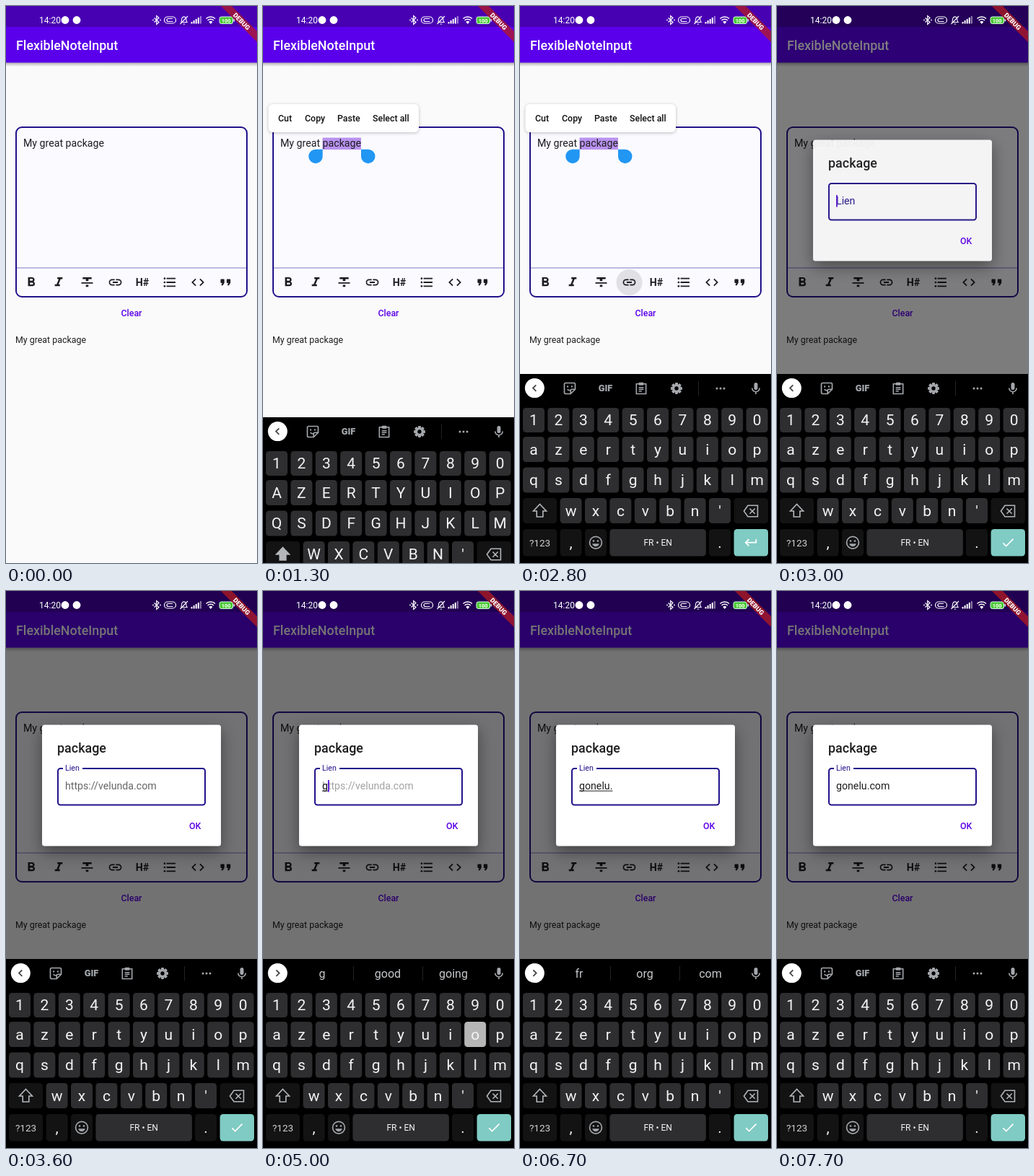
Recreate the animation shown at these times as an HTML page. Size 348 px wide and 772 px high, loop 8000 ms.

```html
<!DOCTYPE html>
<html lang="en">
<head>
<meta charset="utf-8">
<title>Link dialog</title>
<style>
html, body { margin: 0; width: 100%; height: 100%; overflow: hidden; background: #fafafa; }
svg { display: block; width: 100vw; height: 100vh; }
text { font-family: Roboto, sans-serif; white-space: pre; }
</style>
</head>
<body>
<svg id="stage" viewBox="0 0 348 772"></svg>
<script>
const NS = 'http://www.w3.org/2000/svg';
const LOOP = 8000, STEP = 100;
const INDIGO = '#21128a', PURPLE = '#5c00e6', INK = '#1d1d1f', GREY = '#a4a8ac';
const stage = document.getElementById('stage');

function add(parent, tag, attrs = {}) {
  const el = document.createElementNS(NS, tag);
  for (const k in attrs) el.setAttribute(k, attrs[k]);
  parent.appendChild(el);
  return el;
}
const set = (el, attrs) => { for (const k in attrs) el.setAttribute(k, attrs[k]); };
const group = (parent, attrs) => add(parent, 'g', attrs);
const rect = (parent, x, y, width, height, fill, rx = 0, more = {}) =>
  add(parent, 'rect', { x, y, width, height, fill, rx, ...more });
const circle = (parent, cx, cy, r, fill, more = {}) => add(parent, 'circle', { cx, cy, r, fill, ...more });
const path = (parent, d, fill, more = {}) => add(parent, 'path', { d, fill, ...more });
const line = (parent, d, stroke, width = 1.5, more = {}) =>
  path(parent, d, 'none', { stroke, 'stroke-width': width, ...more });
function text(parent, str, x, y, size, fill, weight = 400, anchor = 'start') {
  const el = add(parent, 'text', { x, y, 'font-size': size, fill, 'font-weight': weight, 'text-anchor': anchor });
  el.textContent = str;
  return el;
}
const show = (el, on) => el.setAttribute('visibility', on ? 'inherit' : 'hidden');
const alpha = (el, a) => { el.setAttribute('opacity', a); show(el, a > 0); };
// 24-unit icon centred on a point
const icon = (parent, cx, cy, size = 21.3) =>
  group(parent, { transform: `translate(${cx - size / 2} ${cy - size / 2}) scale(${size / 24})` });

const clamp = v => Math.max(0, Math.min(1, v));
const ramp = (t, from, to) => clamp((t - from) / (to - from));
const easeOut = p => 1 - (1 - p) ** 3;
const latest = (list, t) => list.reduce((found, row) => row[0] <= t ? row : found);

// ---------- page ----------
const defs = add(stage, 'defs');
const shade = add(defs, 'linearGradient', { id: 'shade', x1: 0, y1: 0, x2: 0, y2: 1 });
add(shade, 'stop', { offset: 0, 'stop-color': '#000', 'stop-opacity': .32 });
add(shade, 'stop', { offset: 1, 'stop-color': '#000', 'stop-opacity': 0 });

const page = group(stage);
rect(page, 0, 0, 348, 772, '#fafafa');
rect(page, 0, 78, 348, 6, 'url(#shade)');
rect(page, 0, 0, 348, 78.5, '#5b00eb');
rect(page, 0, 0, 348, 29, '#4800b3');
text(page, 'FlexibleNoteInput', 14, 60.5, 17.9, '#fff', 500);

rect(page, 14, 168, 320, 235, '#fafaff', 8, { stroke: INDIGO, 'stroke-width': 2 });
rect(page, 15, 362.5, 318, 1, '#8078c4');
const selection = rect(page, 82.5, 182.5, 53.5, 16.5, '#b992f0');
text(page, 'My great package', 24, 195.3, 14.18, INK);

const ripple = circle(page, 151.5, 383, 18, '#000');
const toolPaths = [
  [35, 'M15.6 10.8c1-.7 1.65-1.8 1.65-2.8 0-2.3-1.75-4-4-4H7v14h7c2.1 0 3.7-1.7 3.7-3.8 0-1.5-.8-2.8-2.1-3.4zM10 6.5h3a1.5 1.5 0 0 1 0 3h-3zm3.5 9H10v-3h3.5a1.5 1.5 0 0 1 0 3z'],
  [73, 'M10 4v3h2.2l-3.4 8H6v3h8v-3h-2.2l3.4-8H18V4z'],
  [112.5, 'M10 19h4v-3h-4zM5 4v3h5v3h4V7h5V4zM3 14h18v-2H3z'],
  [151.5, 'M3.9 12A3.1 3.1 0 0 1 7 8.9h4V7H7a5 5 0 0 0 0 10h4v-1.9H7A3.1 3.1 0 0 1 3.9 12zM8 13h8v-2H8zM17 7h-4v1.9h4a3.1 3.1 0 0 1 0 6.2h-4V17h4a5 5 0 0 0 0-10z'],
  [227, 'M7 19h14v-2H7zM7 13h14v-2H7zM7 5v2h14V5z'],
  [266, 'M9.4 16.6L4.8 12l4.6-4.6L8 6l-6 6 6 6zM14.6 16.6l4.6-4.6-4.6-4.6L16 6l6 6-6 6z']
];
for (const [x, d] of toolPaths) path(icon(page, x, 383), d, INK);
for (const y of [6, 12, 18]) circle(icon(page, 227, 383), 4, y, 1.5, INK);
const quote = icon(page, 305, 383);
for (const x of [0, 9.5])
  path(quote, 'M6.2 17c.5 0 1-.3 1.2-.7l1.9-3.2c.2-.3.2-.6.2-.9V8c0-.6-.4-1-1-1h-4c-.6 0-1 .4-1 1v4c0 .6.4 1 1 1h1.8L5 15.1c-.4.9.2 1.9 1.2 1.9z', INK, { transform: `translate(${x})` });
text(page, 'H#', 189, 388, 14.2, INK, 700, 'middle');
text(page, 'Clear', 174, 429.8, 12.4, PURPLE, 500, 'middle');
text(page, 'My great package', 13, 466.6, 12.4, INK);

const handles = group(page);
path(handles, 'M82.7 198.7V208.4A9.75 9.75 0 1 1 72.95 198.7z', '#2196f3');
path(handles, 'M136 198.7V208.4A9.75 9.75 0 1 0 145.75 198.7z', '#2196f3');

const menu = group(page);
rect(menu, 7.5, 136, 208.5, 39, '#fff', 6, { style: 'filter:drop-shadow(0 1px 2px rgba(0,0,0,.25))' });
[['Cut', 21], ['Copy', 58], ['Paste', 103], ['Select all', 152]]
  .forEach(([label, x]) => text(menu, label, x, 160, 12.4, '#111', 500));

// ---------- dialog ----------
const scrim = rect(stage, 0, 0, 348, 772, '#000');
const dialog = group(stage);
rect(dialog, 50, 185.5, 248, 168, '#fff', 3.5, { style: 'filter:drop-shadow(0 8px 11px rgba(0,0,0,.42))' });
text(dialog, 'package', 71, 223.5, 17.9, INK, 500);
rect(dialog, 72, 246, 204, 50.5, 'none', 3.5, { stroke: INDIGO, 'stroke-width': 2 });
const notch = rect(dialog, 79, 244, 27, 4, '#fff');
const hint = text(dialog, 'https://velunda.com', 82, 275, 14.18, '#666');
const label = text(dialog, 'Lien', 82, 275, 14.18, INDIGO);
const typed = text(dialog, '', 82, 275, 14.18, INK);
const underline = rect(dialog, 82, 276.6, 0, 1, INK);
const caret = rect(dialog, 82, 262, 1.8, 16.5, '#5a10dc');
text(dialog, 'OK', 254, 329.6, 12.4, PURPLE, 500);

// ---------- status bar ----------
const status = group(stage);
text(status, '14:20', 46, 24.2, 12, '#fff');
circle(status, 82, 19.5, 5.4, '#fff');
circle(status, 98, 19.5, 5.4, '#fff');
line(status, 'M205.5 16.5l6.5 6-3.3 3v-12l3.3 3-6.5 6', '#fff', 1.2);
circle(status, 204, 19.5, .9, '#fff');
circle(status, 214, 19.5, .9, '#fff');
rect(status, 219.5, 15, 16, 9, 'none', 4.5, { stroke: '#fff', 'stroke-width': 1.2 });
line(status, 'M231 17.5h-6a2 2 0 0 0 0 4h6.5', '#fff', 1.2);
line(status, 'M242.5 22.5h8.5c-1.4-1.4-1-4-1.4-5.4a3 3 0 0 0-5.8 0c-.4 1.4 0 4-1.3 5.4M245.7 25h2.4M241.5 25l10.5-11', '#fff', 1.1);
for (let i = 0; i < 5; i++) rect(status, 256.5 + i * 3.1, 22 - i * 2, 2, 2.5 + i * 2, '#fff', .5, { opacity: i > 3 ? .5 : 1 });
line(status, 'M277.5 17.5a9 9 0 0 1 12.5 0M279.6 20a6 6 0 0 1 8.3 0', '#fff', 1.5);
path(status, 'M281.3 22a3.5 3.5 0 0 1 5 0l-2.5 3z', '#fff');
rect(status, 296, 15, 18.5, 9.5, '#49c933', 2.5, { stroke: '#dfe', 'stroke-width': 1 });
rect(status, 315.5, 17.8, 1.5, 4, '#dfe', .7);
text(status, '100', 305.2, 22.6, 7.5, '#fff', 700, 'middle');

const banner = group(stage, { transform: 'translate(348 0) rotate(45) scale(.886)' });
rect(banner, -40, 28, 80, 12, '#b71c1c', 0, { opacity: .72 });
text(banner, 'DEBUG', 0, 37.6, 10.2, '#fff', 900, 'middle');

// ---------- keyboard ----------
const board = group(stage);
rect(board, 0, 510, 348, 270, '#000');
circle(board, 20.3, 529.6, 13.5, '#fff');
const chevron = line(board, '', '#444', 1.8);
const mic = icon(board, 327, 530, 20);
rect(mic, 9, 2.5, 6, 12, GREY, 3);
line(mic, 'M5.8 11.5a6.2 6.2 0 0 0 12.4 0M12 17.5V21.5', GREY, 2);

const strip = group(board);
const sticker = icon(strip, 69, 530, 20);
line(sticker, 'M21 13.5V5a2 2 0 0 0-2-2H5a2 2 0 0 0-2 2v14a2 2 0 0 0 2 2h8.5zh-5.500a2 2 0 0 0-2 2v5.500M8 13.500a4.500 4.500 0 0 0 5 1.500', GREY, 2);
circle(sticker, 8.5, 9, 1.4, GREY);
circle(sticker, 15.5, 9, 1.4, GREY);
text(strip, 'GIF', 118.5, 534.3, 12.8, GREY, 900, 'middle');
const clip = icon(strip, 168, 530, 20);
line(clip, 'M4 4.500H20V21H4zM8 10.500h8M8 13.500h8M8 16.500h5', GREY, 1.9);
rect(clip, 8, 2, 8, 5, GREY, 1);
const gear = icon(strip, 217, 530, 20);
for (let i = 0; i < 4; i++) rect(gear, 9.6, 2.5, 4.8, 19, GREY, 1, { transform: `rotate(${i * 45} 12 12)` });
circle(gear, 12, 12, 7.2, GREY);
circle(gear, 12, 12, 3.2, '#000');
rect(strip, 247, 520, 1, 20, '#222');
for (const x of [273, 278, 283]) circle(strip, x, 530, 1.5, GREY);

const words = group(board);
const slots = [82, 173, 264].map(x => text(words, '', x, 535.5, 16, '#c6c9cc', 400, 'middle'));
for (const x of [125, 221]) rect(words, x, 520, 1, 20, '#222');

const keys = {};
const DARK = '#131314', KEY = '#2e2e30';
function key(name, x, y, w, h, fill, size = 21, drop = 7.3) {
  const cap = rect(board, x, y, w, h, fill, 4.5);
  const glyph = text(board, size ? name : '', x + w / 2, y + h / 2 + drop, size || 10, '#f4f4f4', 400, 'middle');
  keys[name] = { cap, glyph, fill };
}
const PITCH = 34.4;
const row = (chars, x, y, h) => [...chars].forEach((c, i) => key(c, x + i * PITCH, y, 30, h, KEY));
row('1234567890', 4, 557, 34);
row('azertyuiop', 4, 597, 35);
row('qsdfghjklm', 4, 639.500, 35);
row("wxcvbn'", 55.6, 682, 35);
key('shift', 4, 682, 47, 35, DARK, 0);
key('back', 296.6, 682, 47.4, 35, DARK, 0);
key('?123', 4, 725, 47, 37.500, DARK, 13.5, 4.8);
key(',', 55.6, 725, 30, 37.500, DARK);
key('emoji', 90, 725, 30, 37.500, DARK, 0);
key('FR • EN', 124.4, 725, 133.500, 37.500, KEY, 12, 4.3);
key('.', 262, 725, 30, 37.500, DARK);
key('enter', 296.6, 725, 47.4, 37.500, '#80cbc4', 0);
keys['?123'].glyph.setAttribute('fill', '#cfd2d4');

const shift = path(board, 'M27.500 690.500l9 9.500h-4.700v8h-8.600v-8h-4.700z', 'none', { stroke: '#b4b7ba', 'stroke-width': 1.6 });
line(board, 'M316 692.300h13.500v15.500H316l-5.500-7.700zM318.500 696.500l7.200 7.200M325.700 696.500l-7.200 7.200', '#b4b7ba', 1.6);
circle(board, 105, 743.7, 8.4, 'none', { stroke: '#a4a8ac', 'stroke-width': 1.7 });
circle(board, 102, 741.500, 1.3, GREY);
circle(board, 108, 741.500, 1.3, GREY);
path(board, 'M100.300 745.300h9.400a4.800 4.800 0 0 1-9.400 0z', GREY);
const enter = path(icon(board, 320.300, 743.7, 21), 'M19 7v4H5.800l3.600-3.600L8 6l-6 6 6 6 1.400-1.400L5.800 13H21V7z', '#fff');
const check = path(icon(board, 320.300, 743.7, 21), 'M9 16.200L4.800 12l-1.400 1.400L9 19 21 7l-1.400-1.400z', '#fff');

// ---------- timeline ----------
const entries = [
  [0, ''],
  [4900, 'g', 'g', 'good', 'going'],
  [5100, 'go', 'go', 'good', 'going'],
  [5200, 'gon', 'gon', 'gone', 'going'],
  [5400, 'gone', 'gone', 'Gone', 'gone to'],
  [5500, 'gonel', 'gonel', 'gonelu', 'Gonelu'],
  [6300, 'gonelu', 'gonelu', 'Gonelu', 'gone'],
  [6700, 'gonelu.', 'fr', 'org', 'com'],
  [6900, 'gonelu.com', 'com', 'come', 'comes'],
  [7000, 'gonelu.com']
];
const presses = [
  [4500, 4600, 'g'], [5000, 5100, 'o'], [5100, 5200, 'n'], [5300, 5400, 'e'],
  [5400, 5500, 'l'], [5900, 6000, 'u'], [6500, 6600, '.']
];
const blinks = [
  [0, false], [3000, true], [3500, false], [4000, true], [4500, false], [4900, true],
  [6000, false], [6300, true], [6700, false], [7200, true], [7700, false]
];
const letters = Object.keys(keys).filter(k => /^[a-z]$/.test(k));

function draw(t) {
  const open = t >= 3000;
  const selecting = t >= 900 && !open;
  show(selection, selecting);
  show(handles, selecting);
  alpha(menu, selecting ? ramp(t, 860, 1000) : 0);
  const tap = ramp(t, 2500, 2800);
  alpha(ripple, open ? 0 : .1 * tap);
  ripple.setAttribute('r', 8 + 10 * tap);

  alpha(scrim, open ? .5 + .04 * ramp(t, 3000, 3100) : 0);
  alpha(dialog, open ? .92 + .08 * ramp(t, 3000, 3100) : 0);
  const float = easeOut(ramp(t, 3000, 3250));
  set(label, { y: 275 - 26 * float, 'font-size': 14.18 - 3.54 * float });
  set(notch, { x: 92.5 - 13.5 * float, width: 27 * float });
  alpha(hint, Math.min(ramp(t, 3100, 3400), 1 - ramp(t, 4850, 5150) * .8, 1 - ramp(t, 5000, 5100)));

  const [since, value, ...guesses] = latest(entries, t);
  typed.textContent = value;
  const width = value ? typed.getComputedTextLength() : 0;
  set(underline, { width: guesses.length ? width : 0 });
  caret.setAttribute('x', 82 + width);
  show(caret, latest(blinks, t)[1]);

  const rise = easeOut(ramp(t, 1050, 1694));
  board.setAttribute('transform', `translate(0 ${262 * (1 - rise)})`);
  show(board, rise > 0);
  const caps = t < 1700;
  for (const k of letters) keys[k].glyph.textContent = caps ? k.toUpperCase() : k;
  shift.setAttribute('fill', caps ? '#b4b7ba' : 'none');
  for (const k in keys) keys[k].cap.setAttribute('fill', keys[k].fill);
  for (const [from, to, k] of presses) if (t >= from && t < to) keys[k].cap.setAttribute('fill', '#b6b6b6');
  const guessing = guesses.length > 0;
  show(strip, !guessing);
  show(words, guessing);
  slots.forEach((slot, i) => { slot.textContent = guesses[i] || ''; });
  chevron.setAttribute('d', guessing ? 'M18.300 525.300l4.300 4.300-4.300 4.300' : 'M22.300 525.300l-4.300 4.300 4.300 4.300');
  show(enter, !open);
  show(check, open);
}

const start = performance.now();
function tick(now) {
  const t = Math.max(0, now - start) % LOOP;
  draw(Math.floor(t / STEP) * STEP);
  requestAnimationFrame(tick);
}
draw(0);
requestAnimationFrame(tick);
</script>
</body>
</html>
```
